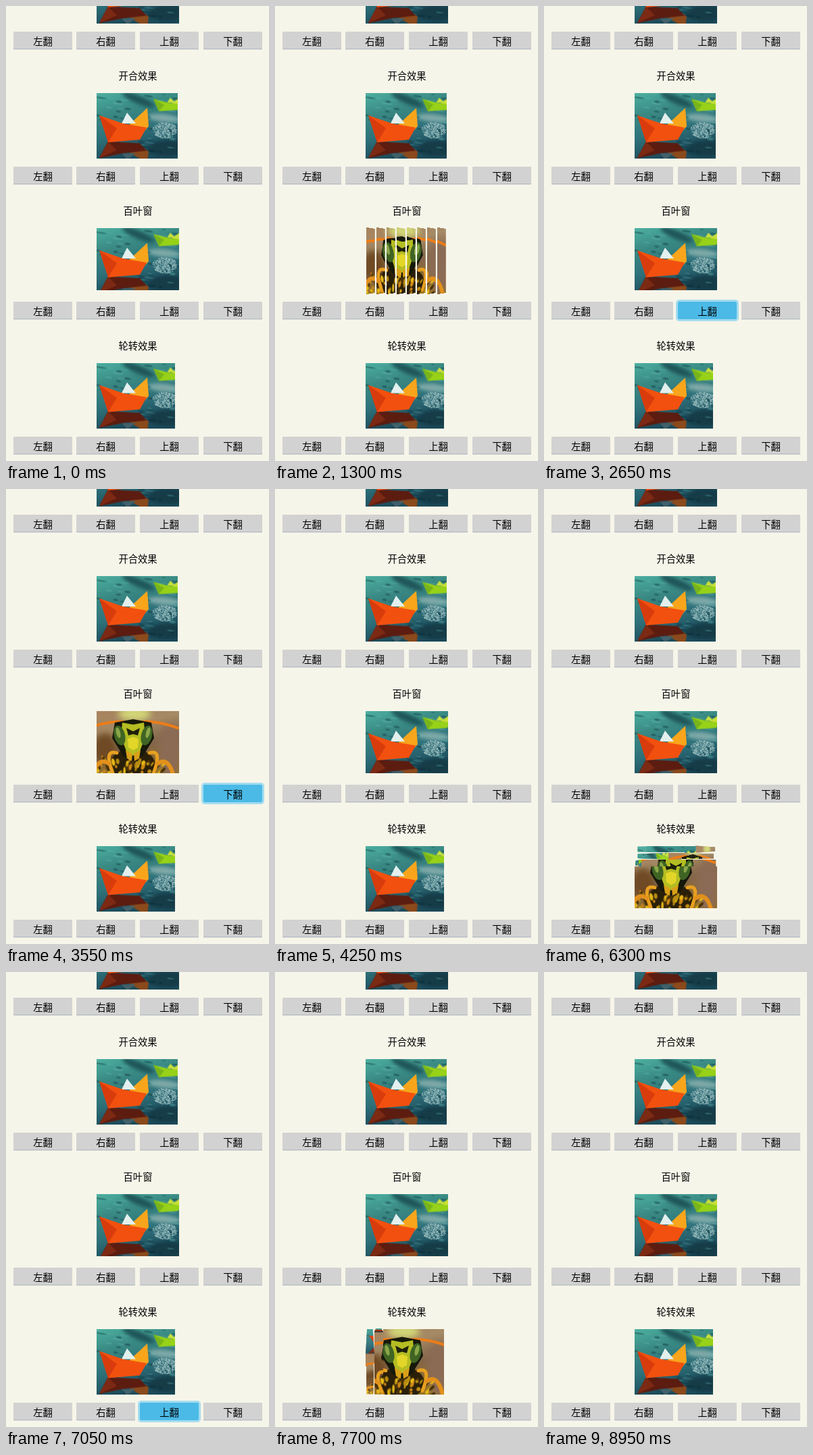
Animation, 389 px wide and 674 px high, one loop 9.35 s. Source, as an HTML page with a canvas:

```html
<!DOCTYPE html>
<html lang="zh-CN">
<head>
<meta charset="utf-8">
<style>
html, body { margin: 0; width: 100%; height: 100%; overflow: hidden; background: #f6f5e9; }
#stage { position: relative; width: 389px; height: 674px; overflow: hidden;
  font: 14.3px/27px "Noto Sans CJK SC", "Noto Sans CJK", sans-serif; color: #000; }
canvas { position: absolute; left: 0; top: 0; }
.title, .btn { position: absolute; text-align: center; white-space: nowrap; }
.title { left: 95px; width: 200px; }
.btn { width: 87px; height: 26px; border-radius: 1px; background: #d2d2d2;
  box-shadow: inset 0 -1px #b4bbc4, 0 1px #dfe0dc; }
.btn.on { background: #4bbae7; box-shadow: 0 0 0 3px #a5dcef; border-radius: 2px; }
</style>
</head>
<body>
<div id="stage"><canvas id="view" width="389" height="674"></canvas></div>
<script>
const stage = document.getElementById('stage');
const g = document.getElementById('view').getContext('2d');
const LOOP = 9350, W = 122, H = 97, LEFT = 134, DEPTH = 160, K = 2;

// labels and buttons
function label(cls, text, x, y) {
  const el = document.createElement('div');
  el.className = cls;
  el.textContent = text;
  if (x) el.style.left = x + 'px';
  el.style.top = y + 'px';
  stage.append(el);
  return el;
}
['开合效果', '百叶窗', '轮转效果'].forEach((s, i) => label('title', s, 0, 89 + i * 200));
const buttons = [0, 1, 2, 3].map(row =>
  ['左翻', '右翻', '上翻', '下翻'].map((s, i) =>
    label('btn', s, Math.round(10.6 + i * 93.8), 38 + row * 200)));

// pictures
function random(seed) {
  return () => (seed = seed * 16807 % 2147483647) / 2147483647;
}

function picture(paint, ...sky) {
  const c = document.createElement('canvas');
  c.width = W * K;
  c.height = H * K;
  const p = c.getContext('2d');
  p.scale(K, K);
  p.lineCap = 'round';
  const fade = p.createLinearGradient(0, 0, 25, H);
  sky.forEach((col, i) => fade.addColorStop(i / (sky.length - 1), col));
  p.fillStyle = fade;
  p.fillRect(0, 0, W, H);
  const d = {
    poly(col, ...v) {
      p.fillStyle = col;
      p.beginPath();
      for (let i = 0; i < v.length; i += 2) p.lineTo(v[i], v[i + 1]);
      p.fill();
    },
    oval(col, x, y, rx, ry, rot = 0) {
      p.fillStyle = col;
      p.beginPath();
      p.ellipse(x, y, rx, ry, rot, 0, 7);
      p.fill();
    },
    curve(col, width, x0, y0, cx, cy, x1, y1) {
      p.strokeStyle = col;
      p.lineWidth = width;
      p.beginPath();
      p.moveTo(x0, y0);
      p.quadraticCurveTo(cx, cy, x1, y1);
      p.stroke();
    },
    blur(px) { p.filter = px ? `blur(${px * K}px)` : 'none'; },
    placed(x, y, sx, sy, draw) {
      p.save();
      p.translate(x, y);
      p.scale(sx, sy);
      draw();
      p.restore();
    }
  };
  paint(d);
  return c;
}

const boat = picture(d => {
  const r = random(71);
  const ship = (hull, side, sail, back) => {
    d.poly(back, 48, 47, 75, 22, 77, 49, 71, 56);
    d.poly(sail, 37, 45, 45, 29, 58, 45);
    d.poly(hull, 4, 33, 39, 45, 74, 51, 64, 69, 17, 73);
    d.poly(side, 4, 33, 30, 52, 17, 73);
  };
  d.blur(3);
  d.oval('#1f5559', 62, 10, 26, 6, 0.4);
  d.oval('#7fa9a8', 100, 37, 24, 6, 0.1);
  d.oval('#163c48', 105, 82, 28, 12);
  d.blur(0.6);
  for (let i = 0; i < 60; i++) {
    d.oval(i % 2 ? 'rgba(100,185,180,.35)' : 'rgba(8,42,54,.4)',
      r() * W, r() * H, 2 + r() * 7, 0.6 + r() * 1.2, 0.15);
  }
  d.placed(82, -6, 0.6, 0.45, () => ship('#97d118', '#79b41a', '#c9e03a', '#c9e03a'));
  d.placed(0, 117, 1, -0.62, () => ship('#5c1c10', '#7c2a14', '#41606a', '#8a4a1c'));
  // splash
  d.blur(0.3);
  for (let i = 0; i < 320; i++) {
    const a = r() * 6.3, q = Math.sqrt(r());
    d.oval(['#9dbfbe', '#6d9ea4', '#82abae', '#4b8089'][i % 4],
      101 + Math.cos(a) * q * 18, 55 + Math.sin(a) * q * 12, 1.1, 0.9);
  }
  ship('#f2500f', '#d93c0c', '#e3f0ee', '#f9a51c');
}, '#4db0a0', '#3a8a84', '#2f727b', '#1d4d5c');

const wasp = picture(d => {
  const r = random(29);
  d.blur(5);
  d.oval('#d3d878', 56, 4, 24, 10);
  d.oval('#6f4a24', 12, 55, 18, 22);
  d.oval('#8b6b55', 108, 60, 18, 40);
  d.blur(0.6);
  d.oval('#2a1f08', 53, 80, 34, 24);
  for (let i = 0; i < 60; i++) {
    const x = r() * 100;
    d.oval(['#e6b818', '#b98d12', '#4a320a', '#d08a16'][i % 4],
      x, 70 + r() * 27 + Math.max(0, x - 60) / 5, 2 + r() * 5, 1.2 + r() * 1.6, 1 + x / 70);
  }
  for (const side of [-1, 1]) {
    d.placed(54, 0, side, 1, () => {
      d.blur(0.3);
      d.curve('#e8a020', 5, 24, 62, 44, 56, 30, 92);
      d.curve('#e2901c', 6, 36, 78, 52, 66, 60, 97);
      d.curve('#ec7d18', 4, 5, 17, 30, 12, 66, 25);
      d.poly('#16180a', 0, 12, 27, 17, 31, 40, 15, 66, 0, 74);
      d.poly('#b4bd22', 0, 20, 16, 17, 18, 38, 9, 62, 0, 66);
      d.oval('#3f6424', 20, 36, 8, 15, 0.25);
      d.oval('#8aa648', 22, 32, 3, 8, 0.25);
      d.poly('#1e200b', 0, 30, 10, 25, 7, 36, 0, 34);
      d.poly('#e2d628', 0, 38, 8, 41, 7, 54, 0, 58);
      d.poly('#d9a018', 1, 63, 11, 58, 9, 70, 2, 74);
    });
  }
}, '#a8835c', '#a58a66', '#83664a', '#9a7420');

// a piece of a picture turned about a line; a runs along the turn, c across it
function face(pic, horiz, a0, a1, c0, c1, from, to, deg, mid, top) {
  const t = deg * Math.PI / 180, cos = Math.cos(t), sin = Math.sin(t);
  const scale = u => DEPTH / (DEPTH + u * sin);
  for (let a = a0; a < a1 - 0.001;) {
    const b = deg ? Math.min(a + 1, a1) : a1;
    const u = a - from, v = b - from, s = scale((u + v) / 2);
    const p = to + u * cos * scale(u);
    const w = to + v * cos * scale(v) - p + (b < a1 ? 0.4 : 0);
    const c = mid + (c0 - mid) * s, h = (c1 - c0) * s;
    if (horiz) {
      g.drawImage(pic, a * K, c0 * K, (b - a) * K, (c1 - c0) * K, LEFT + p, top + c, w, h);
    } else {
      g.drawImage(pic, c0 * K, a * K, (c1 - c0) * K, (b - a) * K, LEFT + c, top + p, h, w);
    }
    a = b;
  }
}

function still(pic, w, h, top) {
  g.drawImage(pic, 0, 0, w * K, h * K, LEFT, top, w, h);
}

function blinds(deg, horiz, w, h, top) {
  if (deg < 14) return still(wasp, w, h, top);
  if (deg > 166) return still(boat, w, h, top);
  const len = (horiz ? w : h) / 8, across = horiz ? h : w;
  const pic = deg < 90 ? wasp : boat, tilt = deg < 90 ? deg : deg - 180;
  for (let i = 0; i < 8; i++) {
    const mid = (i + 0.5) * len;
    face(pic, horiz, i * len, (i + 1) * len, 0, across, mid, mid, tilt, across / 2, top);
  }
}

function inTurn(deg, horiz, w, h, top) {
  if (deg < 1) return still(wasp, w, h, top);
  if (deg > 329) return still(boat, w, h, top);
  const len = horiz ? w : h, part = (horiz ? h : w) / 9;
  for (let i = 0; i < 9; i++) {
    const d = Math.max(0, Math.min(90, deg - i * 30));
    const axis = d / 90 * len, c = i * part, mid = c + part / 2;
    if (d < 90) face(wasp, horiz, 0, len, c, c + part, 0, axis, d, mid, top);
    if (d > 0) face(boat, horiz, 0, len, c, c + part, len, axis, d - 90, mid, top);
  }
}

// four taps, left to right, on each of the two lower rows
const taps = [[700, 1750, 2650, 3550], [4900, 6050, 7050, 8150]];

// turn: 0 shows the wasp, 1 the boat
function pose(times, t) {
  const n = times.filter(x => x <= t).length - 1;
  if (n < 0) return { turn: 1, horiz: false, pressed: -1 };
  const age = t - times[n];
  const f = Math.max(0, Math.min(1, (age - 10) / 810));
  const e = 0.5 - Math.cos(f * Math.PI) / 2;
  return { turn: n % 2 ? e : 1 - e, horiz: n < 2, pressed: age < 50 ? n : -1 };
}

function frame() {
  const t = performance.now() % LOOP;
  const [a, b] = taps.map(times => pose(times, t));
  g.clearRect(0, 0, 389, 674);
  still(boat, W, H, -71);
  still(boat, 120, H, 129);
  blinds(a.turn * 180, a.horiz, a.horiz ? 120 : W, a.horiz ? H : 92, 329);
  inTurn(b.turn * 330, b.horiz, b.horiz ? W : 116, b.horiz ? 92 : H, 528.5);
  [a, b].forEach((p, row) => buttons[row + 2].forEach((el, i) =>
    el.classList.toggle('on', i === p.pressed)));
  requestAnimationFrame(frame);
}
frame();
</script>
</body>
</html>
```
